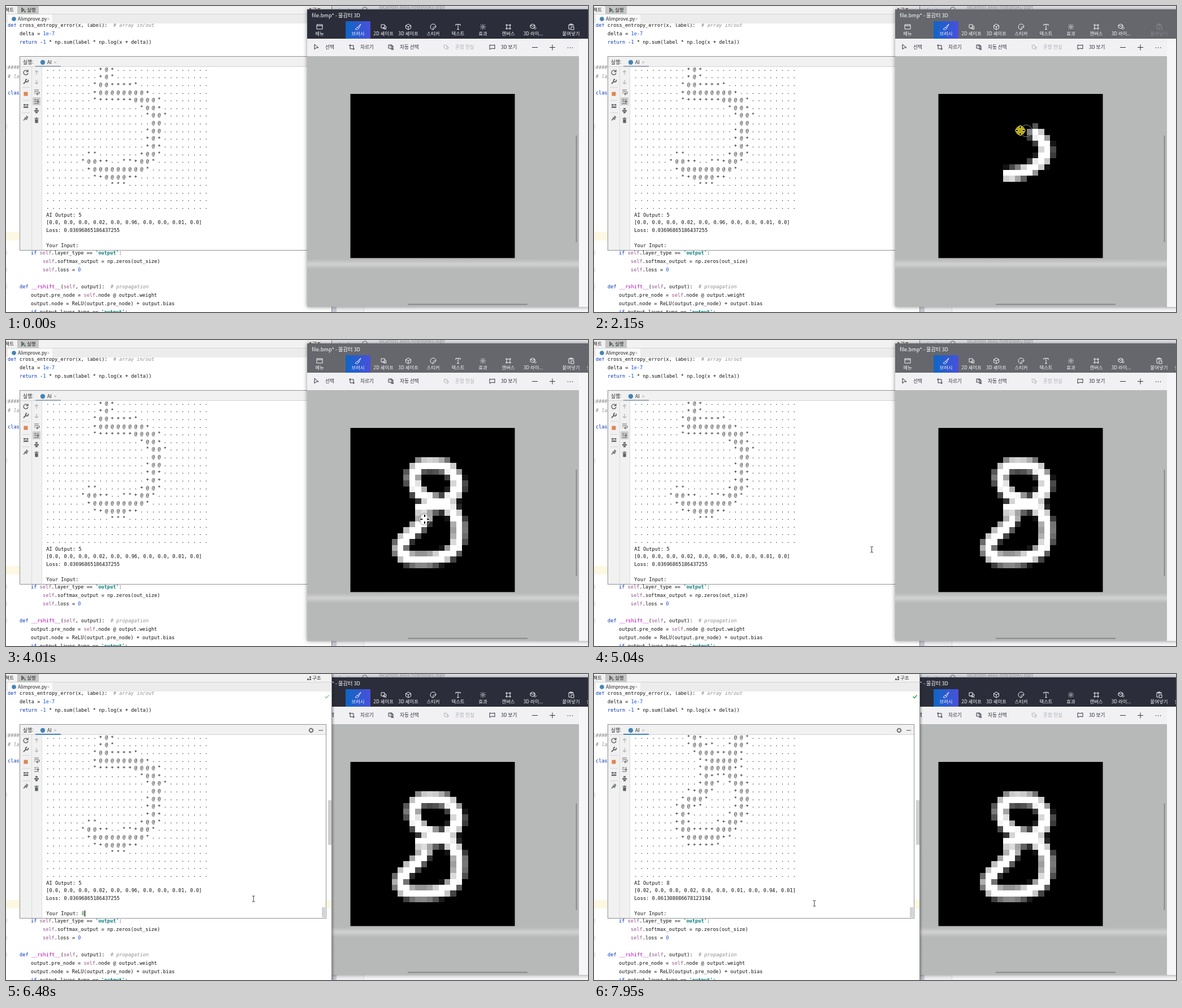
An HTML page with a canvas for the animation above (8 s loop, 1030 px wide and 543 px high).

```html
<!DOCTYPE html>
<html lang="ko">
<head>
<meta charset="utf-8">
<style>
html, body { margin: 0; width: 100%; height: 100%; overflow: hidden; background: #fff; }
canvas { display: block; }
</style>
</head>
<body>
<canvas width="1030" height="543"></canvas>
<script>
const g = document.querySelector('canvas').getContext('2d');
const LOOP = 8000, STEP = 71.6;
const MONO = '8.64px "DejaVu Sans Mono", "Noto Sans Mono", monospace';
const SANS = '"Noto Sans CJK KR", "Noto Sans CJK", sans-serif';

// ---------- helpers ----------
const clamp = v => Math.max(0, Math.min(1, v));
const ramp = (t, a, b) => clamp((t - a) / (b - a));

function rect(x, y, w, h, fill) { g.fillStyle = fill; g.fillRect(x, y, w, h); }

function dot(x, y, r, fill) {
  g.fillStyle = fill;
  g.beginPath(); g.arc(x, y, r, 0, 7); g.fill();
}

function icon(d, x, y, color, width = 1, fill) {
  const p = new Path2D(d);
  g.save();
  g.translate(x, y);
  if (fill) { g.fillStyle = fill; g.fill(p); }
  g.strokeStyle = color; g.lineWidth = width;
  g.stroke(p);
  g.restore();
}

function text(s, x, y, color, size = 8.5, align = 'left') {
  g.font = size + 'px ' + SANS;
  g.textAlign = align; g.fillStyle = color;
  g.fillText(s, x, y + 3.2);
}

function mono(s, x, y, color = '#111', style = '') {
  g.font = style + ' ' + MONO;
  g.textAlign = 'left'; g.fillStyle = color;
  g.fillText(s, x, y + 3);
}

function fade(x0, y0, x1, y1, ...stops) {
  const f = g.createLinearGradient(x0, y0, x1, y1);
  stops.forEach((c, i) => f.addColorStop(i / (stops.length - 1), c));
  return f;
}

// Linear interpolation between [time, ...values] keys
function at(keys, t) {
  let i = 0;
  while (i < keys.length - 2 && t > keys[i + 1][0]) i++;
  const [a, b] = [keys[i], keys[i + 1]], k = ramp(t, a[0], b[0]);
  return a.slice(1).map((v, n) => v + (b[n + 1] - v) * k);
}

// ---------- brush stroke ----------
const PATH = [
  [734,300],[757,295],[780,285],[797,268],[799,252],[791,235],[778,224],[754,221],[733,223],
  [721,236],[721,252],[728,266],[745,280],[770,290],[790,304],[800,322],[801,345],[797,365],
  [782,380],[756,388],[725,389],[705,384],[697,370],[704,354],[720,339],[733,327],[741,316]];
const PROGRESS = [[1400, 0], [2150, 7], [2880, 16], [3600, 26]];

function strokeAt(u) {
  const i = Math.min(Math.floor(u), PATH.length - 2), f = u - i;
  const p = n => PATH[Math.max(0, Math.min(PATH.length - 1, i + n))];
  return [0, 1].map(k => {
    const [a, b, c, d] = [p(-1)[k], p(0)[k], p(1)[k], p(2)[k]];
    return b + f / 2 * (c - a + f * (2*a - 5*b + 4*c - d + f * (3*(b - c) + d - a)));
  });
}

function drawDigit(t) {
  rect(609.5, 156, 291, 291.3, '#000');
  if (t < 1480) return;
  const end = at(PROGRESS, t - 130)[0], pts = [];
  for (let u = 0; u < end; u += 0.15) pts.push(strokeAt(u));
  pts.push(strokeAt(end));
  const s = 10.38;
  for (let r = 4; r < 25; r++) for (let c = 6; c < 21; c++) {
    const x = 610 + s * c, y = 156 + s * r;
    const d = Math.min(...pts.map(p => Math.hypot(p[0] - x - s / 2, p[1] - y - s / 2)));
    const v = Math.round(255 * clamp((15.7 - d) / 9.5));
    if (v > 8) {
      const x0 = Math.round(x), y0 = Math.round(y);
      rect(x0, y0, Math.round(x + s) - x0, Math.round(y + s) - y0, `rgb(${v},${v},${v})`);
    }
  }
}

// ---------- paint window ----------
const CUBE = 'M0-5L4.5-2.5V2.5L0 5L-4.5 2.5V-2.5ZM-4.5-2.5L0 0L4.5-2.5M0 0V5';
const TOOLS = [
  [555, '메뉴', 'M-5-4H5V4H-5ZM-5-2H5'],
  [623, '브러시', 'M5-5L-1 1L1 3ZM-1 1C-4 1-3 4-5 4C-2 6 0 5 1 3'],
  [668, '2D 셰이프', 'M-4-4H2V2H-4ZM-1 1A3 3 0 1 0 2-2M0 0L5 5'],
  [712, '3D 셰이프', CUBE],
  [756, '스티커', 'M5 0A5 5 0 1 0 0 5L5 0C1-1-1 1 0 5'],
  [800, '텍스트', 'M-4-2V-4.5H4V-2M0-4.5V4.5M-2 4.5H2'],
  [844, '효과', 'M2 0A2 2 0 1 0-2 0A2 2 0 1 0 2 0M0-5V-3.5M0 3.5V5M-5 0H-3.5M3.5 0H5M-4-4L-2.7-2.7M4 4L2.7 2.7M-4 4L-2.7 2.7M4-4L2.7-2.7'],
  [889, '캔버스', 'M-3-5V5M3-5V5M-5-3H5M-5 3H5'],
  [933, '3D 라이...', 'M-1-5L3-3V1L-1 3L-5 1V-3ZM-5-3L-1-1L3-3M5 1A2 2 0 1 1 4 0'],
  [1000, '붙여넣기', 'M-1 4H-4V-4H4V-1M-2-5H2V-3H-2ZM0 0H5V5H0Z']];
const OPTIONS = [
  [549, 'M-3-5L4 1H0L-3 4Z', 565, '선택'],
  [612, 'M-3-5V3H5M-5-3H3V5', 627, '자르기'],
  [681, 'M-4-4H2V2H-4ZM-2-2H4V4H0M1 1L5 5', 697, '자동 선택'],
  [779, 'M-4-3L0-4L3 0V4L-3 2ZM0-1L5 1', 795, '혼합 현실'],
  [860, 'M-4-4L0-3L5-4V3L0 2L-4 4Z', 876, '3D 보기']];

function paintWindow(t) {
  const active = ramp(t, 1360, 1480) - ramp(t, 5330, 5470);
  g.save();
  g.shadowColor = 'rgba(0,0,0,.45)'; g.shadowBlur = 7;
  rect(533, 6, 500, 528, '#b7b9b8');
  g.restore();

  // workspace
  rect(533, 89, 481, 445, '#b7b9b8');
  rect(533, 449, 481, 18, fade(0, 449, 0, 467, '#b7b9b8', '#d0d1d0', '#b7b9b8'));
  rect(1014, 58, 16, 476, '#f6f6f8');
  rect(1008.5, 230, 2, 189, '#87898a');
  rect(711, 528.5, 212, 2, '#87898a');
  drawDigit(t);

  // header
  const [r, gr, b] = [[43, 102], [45, 103], [58, 108]].map(([p, q]) => Math.round(p + (q - p) * active));
  rect(533, 6, 497, 52, `rgb(${r},${gr},${b})`);
  rect(601, 27, 44, 31, fade(601, 0, 645, 0, '#0f66c4', '#4a50dc'));
  text('file.bmp* - 물감터 3D', 541, 17, '#fff', 9.2);
  for (const [x, label, d] of TOOLS) {
    const dim = x === 1000 && t > 1400 && t < 3780;
    const color = dim ? '#85868e' : '#f4f4f6';
    icon(d, x, 37, color);
    text(label, x, 49, color, 8.4, 'center');
  }
  if (t > 3780) text('실행 취소', 1027.5, 49, '#f4f4f6', 8.4);

  // option bar
  rect(533, 58, 481, 31, '#f1f1f4');
  for (const [x, d, tx, label] of OPTIONS) {
    const color = x === 779 ? '#aeb0b6' : '#2c2d38';
    icon(d, x, 73, color);
    text(label, tx, 73, color, 8.6);
  }
  icon('M-5 0H5', 936, 73.5, '#333');
  icon('M-5 0H5M0-5V5', 967, 73.5, '#333');
  for (const x of [994.5, 998.5, 1002.5]) dot(x, 74, 0.8, '#333');
}

// ---------- editor ----------
const CODE = [
  [3, 34, 'def cross_entropy_error(x, label):  # array in/out'],
  [24, 49, 'delta = 1e-7'],
  [24, 64, 'return -1 * np.sum(label * np.log(x + delta))'],
  [3, 109, '########'],
  [3, 125, '# layer'],
  [3, 154, 'class Layer:'],
  [44, 438, "if self.layer_type == 'output':"],
  [65, 453, 'self.softmax_output = np.zeros(out_size)'],
  [65, 468, 'self.loss = 0'],
  [24, 498, 'def __rshift__(self, output):  # propagation'],
  [44, 513, 'output.pre_node = self.node @ output.weight'],
  [44, 528, 'output.node = ReLU(output.pre_node) + output.bias'],
  [44, 543, "if output.layer_type == 'output':"]];
const TOKEN = /(#.*)|('[^']*')|\b(def|return|if|class)\b|\b(self)\b|(__\w+__)|(\b\d+(?:e-\d)?)|[^#'\w]+|\w+/g;
const INK = [['#8c8c8c', 'italic'], ['#067d7d', 'bold'], ['#0033b3'], ['#94558d'], ['#b200b2'], ['#1750eb']];

function code(x, y, line) {
  g.font = MONO;
  const w = g.measureText('0').width;
  for (const m of line.matchAll(TOKEN)) {
    const kind = m.slice(1).findIndex(Boolean);
    mono(m[0], x + m.index * w, y, ...(INK[kind] || []));
  }
}

// Each row: first column and its characters, dots elsewhere
const row = s => s.split(' ').reduce((out, part) => {
  const [, col, chars] = part.match(/^(\d+)(.*)$/);
  return out.padEnd(+col, '.') + chars;
}, '').padEnd(28, '.').split('').join(' ');
const FIVE = ['9+@+', '9+@*', '8*@@++++*', '8+@@@@@@@@+', '8*++++++@@@@*', '16*@@+', '17*@@*', '18@@',
  '17*@@', '17+@+', '17+@+', '7** 16+@@*', '6*@@++..**+@@*', '7+@@@@@@@@@*', '8*+@@@@++', '11***', '0', '0', '0'];
const EIGHT = ['9*@+.....@@*', '9*@@+*..*@@*', '10*@@@++@@+', '11*+@@@@@*', '11*@@@@@+*', '11*@+**@@+',
  '11+@@*.*@@+', '9*+@@*...+@@', '8*@@@*....*@@', '7*@@+*.....+@+', '7+@+......*@@+', '7+@+....*+@@+',
  '7+@@++++@@@+', '8+@@@@@@+*', '9+++++*', '0', '0', '0', '0'];
const output = (rows, n, probs, loss) =>
  [...rows.map(row), 'AI Output: ' + n, `[${probs}]`, 'Loss: ' + loss, '', 'Your Input: '];
const BEFORE = output(FIVE, 5, '0.0, 0.0, 0.0, 0.02, 0.0, 0.96, 0.0, 0.0, 0.01, 0.0', '0.03696865186437255');
const AFTER = output(EIGHT, 8, '0.02, 0.0, 0.0, 0.02, 0.0, 0.0, 0.01, 0.0, 0.94, 0.01', '0.061308086678123194');

function consoleText(t) {
  const lines = t < 7020 ? BEFORE : AFTER;
  const shift = t >= 6790 && t < 7020 ? 1 : 0;
  g.save();
  g.beginPath(); g.rect(64, 108, 502, 324); g.clip();
  lines.forEach((s, i) => mono(s, 71.3, 111.7 + 13.63 * (i - shift)));
  if (t >= 6340 && t < 7020) mono('8', 133.8, 425.2 - 13.63 * shift, '#0a7f1a');
  const caret = t >= 5330 && t < 5870 ? [202, 398]
    : t >= 6340 && t < 6790 ? [139.5, 425]
    : t >= 6790 && t < 7020 ? [72, 425]
    : t >= 7080 && t < 7860 ? [134, 425] : null;
  if (caret) rect(caret[0] - 0.5, caret[1] - 5.5, 1.2, 11, '#000');
  g.restore();
}

const SIDE = [
  [35, 118, 'M3.5-2A4 4 0 1 0 4 1M4-5V-1.5H0.5', '#5f6367', 1.4],
  [35, 134, 'M-4 4L1-1M4-3A2.4 2.4 0 1 1 2-4', '#5f6367', 1.8],
  [35, 178, 'M-4-2.5H0M1-2.5H4.5M-4 1.5H4.5', '#5f6367', 2.6],
  [35, 199, 'M-4 4L-1 1M-2-1L2 3M0-2L3 1M1-4L4-1', '#5f6367', 1.7],
  [54, 118, 'M0 4V-3.5M-3-0.5L0-3.5L3-0.5', '#b2b4b6', 1.2],
  [54, 135, 'M0-4V3.5M-3 0.5L0 3.5L3 0.5', '#b2b4b6', 1.2],
  [54, 152, 'M-4-3H4M-4 0H3A2 2 0 0 1 3 4H0M2 2L0 4L2 6M-4 3H-2', '#5f6367', 1.2],
  [54, 169, 'M-4-3H0M-4 0H0M-4 4H4M2.5-4V2M0.5 0L2.5 2L4.5 0', '#5f6367', 1.2],
  [54, 186, 'M-2-3.5H2M-4 0H4M-2 3H2', '#5f6367', 2.4],
  [54, 203, 'M-3.5-3.5H3.5M-1-4.5H1M0-1.5V4.5', '#5f6367', 1.3]];

function runPanel(t) {
  rect(24, 89, 543, 345, '#8f9193');
  rect(25, 90, 541, 343, '#f1f1f1');
  rect(64, 108, 502, 325, '#fff');
  rect(25, 107, 541, 1, '#d3d3d3');
  rect(45, 108, 1, 325, '#dcdcdc');
  rect(63, 108, 1, 325, '#dcdcdc');
  rect(52, 106, 45, 2, t < 5330 ? '#9ca7b8' : '#4083c9');
  text('실행:', 30, 100, '#222', 8.6);
  dot(65, 100, 4.2, '#4584b6');
  text('AI', 73, 100, '#222');
  icon('M-2-2L2 2M2-2L-2 2', 87, 100, '#b0b0b0', 0.8);

  if (t < 5870) rect(47, 162, 14, 14, '#cfcfcf');
  for (const [x, y, d, color, width] of SIDE) icon(d, x, y, color, width);
  rect(51.3, 201, 5.4, 6.5, '#5f6367');
  rect(31.5, 152.5, 7, 7, '#e08450');
  for (const y of [144, 167, 189]) rect(29, y, 13, 1, '#d4d4d4');

  icon('M3 0A3 3 0 1 0-3 0A3 3 0 1 0 3 0M0-4.5V-3M0 3V4.5M-4.5 0H-3M3 0H4.5M-3-3L-2-2M3 3L2 2M-3 3L-2 2M3-3L2-2', 540, 100, '#5f6367', 1.4);
  icon('M-4 0H4', 557, 100, '#5f6367', 1.2);
  consoleText(t);
  rect(559, 414, 6, 18, '#d2d2d2');
}

function ide(t) {
  rect(0, 0, 577, 543, '#fff');
  rect(0, 0, 577, 14, '#f2f2f2');
  rect(0, 14, 577, 1, '#d4d4d4');
  rect(0, 15, 577, 16, '#ececec');
  rect(3, 15, 79, 16, '#fafafa');
  rect(20, 0, 38, 14, '#c6c6c6');
  text('젝트', 14, 7, '#222', 8.5, 'right');
  icon('M-2-3L2 0L-2 3Z', 30, 7, '#555', 1.6);
  dot(33.5, 10, 1.5, '#2f9e44');
  text('실행', 37, 7, '#222');
  for (const [x, y] of [[534, 9], [538, 9], [538, 5]]) rect(x - 1, y - 1, 3, 3, '#666');
  text('구조', 542, 7, '#222');
  dot(14, 23, 3.8, '#4584b6');
  text('AIimprove.py', 21, 23, '#222', 8.3);
  icon('M-2-2L2 2M2-2L-2 2', 75, 23, '#b0b0b0', 0.8);

  rect(0, 401, 577, 15, '#fcf8e2');
  for (const y of [109, 214, 438, 468, 498]) icon('M-2-3H1V3H-2', 0.5, y, '#d0d0d0', 0.8);
  g.save();
  g.beginPath(); g.rect(0, 31, 577, 512); g.clip();
  for (const c of CODE) code(...c);
  g.restore();
  const tick = t < 6410 ? '#5f6367' : t < 7330 ? '#8fce97' : '#3fa650';
  icon('M-3.5 0L-1 2.5L3.5-2.5', 568, 40, tick, 1.7);
  rect(570, 224, 6, 79, '#cfcfcf');
  runPanel(t);
  rect(576, 0, 1, 543, '#85878c');
}

// Window behind everything on the right
function backdrop() {
  rect(577, 0, 453, 543, '#f7f7f9');
  rect(577, 0, 453, 7, '#e6e8ee');
  rect(577, 534, 8, 9, '#c9c8d4');
  rect(585, 534, 48, 9, '#f0f0f3');
  rect(633, 534, 1, 9, '#dcdce0');
  icon('M-3 3L0 0M12 0L16 3', 592, 3, '#b8bbc2');
  icon('M-4 4A4 4 0 0 1 4 4', 635, 2, '#777', 1.2);
  text('localhost:8888/notebooks/digit', 660, 2, '#999', 8);
}

// ---------- pointer ----------
const MOVES = [[280,945,562], [420,905,500], [640,805,362], [860,723,280], [1140,739,295], [1290,739,295],
  [1400,734,300]];
const LEAVE = [[3600,741,317], [4010,741,318], [4630,560,352], [4800,560,352], [5300,418,393], [5560,418,393],
  [5720,438,399], [7800,438,399], [7950,390,407]];
const pointer = t => t < 1400 ? at(MOVES, t) : t < 3600 ? strokeAt(at(PROGRESS, t)[0]) : at(LEAVE, t);

function drawPointer(t) {
  if (t < 340) return;
  const [x, y] = pointer(t);
  const pressed = t > 1380 && t < 3640 || t > 5300 && t < 5480;
  if (x < 533) {
    if (pressed) dot(x, y, 6, '#f6f04a');
    icon('M-2.5-5H-.7L0-4.4L.7-5H2.5M0-4.4V4.4M-2.5 5H-.7L0 4.4L.7 5H2.5', x, y, '#333');
    return;
  }
  if (pressed) dot(x, y, 8.5, 'rgba(240,220,0,.75)');
  const [rx, ry] = pointer(t - 45);
  icon('M10.5 0A10.5 10.5 0 1 0-10.5 0A10.5 10.5 0 1 0 10.5 0', rx, ry, 'rgba(150,150,150,.9)');
  icon('M-1.5-8.5H1.5V-3.5H-1.5ZM-1.5 3.5H1.5V8.5H-1.5ZM-8.5-1.5H-3.5V1.5H-8.5ZM3.5-1.5H8.5V1.5H3.5Z', x, y,
    pressed ? '#f4ec80' : '#fff', 1, '#000');
}

function draw(t) {
  backdrop();
  if (t < 5330) { ide(t); paintWindow(t); }
  else {
    paintWindow(t);
    rect(577, 0, 5, 543, fade(577, 0, 582, 0, 'rgba(0,0,0,.25)', 'rgba(0,0,0,0)'));
    ide(t);
  }
  const held = t < 5000 ? Math.floor(t / STEP + 0.05) * STEP : t;
  drawPointer(held);
}

const start = performance.now();
function frame() {
  draw((performance.now() - start) % LOOP);
  requestAnimationFrame(frame);
}
frame();
</script>
</body>
</html>
```
